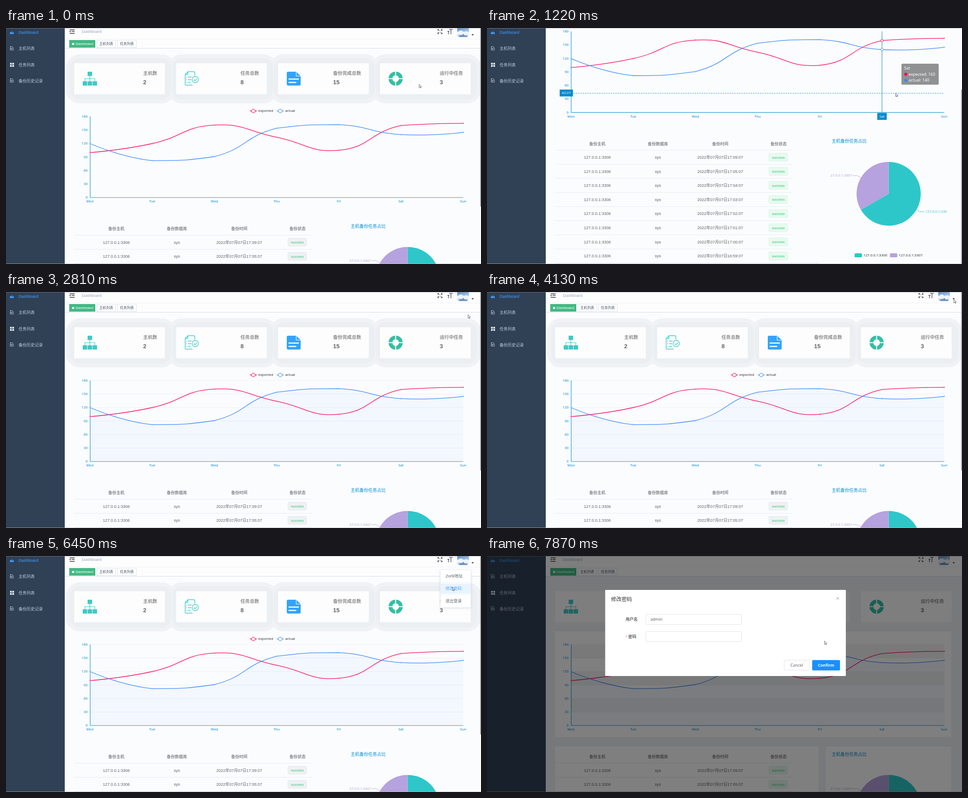
Recreate the animation shown at these times as an HTML page. Size 1059 px wide and 529 px high, loop 8000 ms.

```html
<!DOCTYPE html>
<html lang="zh">
<head>
<meta charset="utf-8">
<title>Dashboard</title>
<style>
html, body { margin: 0; width: 100%; height: 100%; overflow: hidden; background: #fbfcfe; }
svg { display: block; width: 1059px; height: 529px; font-family: "Liberation Sans", "Noto Sans CJK SC", sans-serif; }
text { white-space: pre; }
.n { font-family: "Noto Sans", "Noto Sans CJK SC", sans-serif; }
.tag { fill: #eef1f3; stroke: #e2e6ea; }
.green .tag { fill: #e7faf0; stroke: #d0f5e0; }
</style>
</head>
<body>
<svg id="stage" viewBox="0 0 1059 529"></svg>
<script>
const LOOP = 8000;
const stage = document.getElementById('stage');
const RED = '#ff005a', BLUE = '#3888fa', AXIS = '#008acd', TEAL = '#2ec7c9', LILAC = '#b6a2de';

// --- drawing helpers; text is placed by its vertical centre
const text = (x, y, s, size, fill, more = '') =>
  `<text x="${x}" y="${y + size * .36}" font-size="${size}" fill="${fill}" ${more}>${s}</text>`;
const rect = (x, y, w, h, fill, more = '') =>
  `<rect x="${x}" y="${y}" width="${w}" height="${h}" fill="${fill}" ${more}/>`;
const path = (d, stroke, width = 1, more = '') =>
  `<path d="${d}" fill="none" stroke="${stroke}" stroke-width="${width}" ${more}/>`;
const shape = (d, fill) => `<path d="${d}" fill="${fill}"/>`;
const dot = (x, y, r, fill, more = '') => `<circle cx="${x}" cy="${y}" r="${r}" fill="${fill}" ${more}/>`;
const ring = (x, y, r, color, width, fill = '#fff') => dot(x, y, r, fill, `stroke="${color}" stroke-width="${width}"`);
const group = (id, body) => `<g id="${id}">${body}</g>`;
const each = (list, f) => list.map(f).join('');
const range = n => [...Array(n).keys()];
const MID = ' text-anchor="middle"', END = ' text-anchor="end"', BOLD = ' font-weight="bold"', N = ' class="n"';

// --- sidebar
function sidebar() {
  const ink = '#bfcbd9';
  const doc = y => path(`M16 ${y - 1}v-1.500l-2-2h-4.500v8h2.500M10.500 ${y - 1}h4M10.500 ${y + 1}h2`, ink, .9) +
    ring(14.8, y + 1.8, 2.3, ink, .9, 'none');
  return rect(0, 0, 131, 529, '#304156') +
    shape('M8.500 13.500a4.600 4.600 0 1 1 9 0z', '#409eff') + path('M13 12l1.500-4', '#304156') +
    doc(46) + doc(118) +
    each(range(4), i => rect(9 + i % 2 * 5, 78 + (i >> 1) * 5, 4, 4, '#d8e0ea')) +
    each(['Dashboard', '主机列表', '任务列表', '备份历史记录'], (s, i) =>
      text(28, 10 + i * 36.2, s, 9, i ? ink : '#409eff'));
}

// --- top bar and tags
function header() {
  const ink = '#5a5e66';
  const tag = (x, s) => rect(x, 27.5, 42, 16, '#fff', 'stroke="#d8dce5" stroke-width=".8"') +
    text(x + 21, 35.5, s, 7.8, '#495060', MID);
  const arrow = a => `<g transform="rotate(${a} 967.500 8)">` +
    shape('M962 2.500h4l-1.300 1.300 2 2-1 1-2-2-1.700 1.300z', ink) + '</g>';
  return rect(131, 0, 928, 45, '#fdfdfe') +
    path('M131 24.500H1059', '#eceff2', .8) + path('M131 45.500H1059', '#d8dce5') +
    path('M142 4h11M146 7.500h7M142 12h11', '#333', 1.4) + shape('M142 5.800v4l2.800-2z', '#333') +
    text(169, 8, 'Dashboard', 9, '#97a8be') +
    rect(141, 27, 58, 17, '#42b983') + dot(149.7, 35.7, 2.5, '#fff') + text(155, 35.5, 'Dashboard', 8, '#fff') +
    tag(202.5, '主机列表') + tag(248.5, '任务列表') +
    each([0, 90, 180, 270], arrow) + path('M988 3.200h8M992 3v11M984 7.500h5M986.500 7.500v6.500', ink, 1.5) +
    rect(1006, -4, 26, 25, 'url(#sky)', 'rx="6"') +
    shape('M1006 9l8-4 7 4 5-2 6 3v5h-26z', '#eef4fa') + shape('M1009 20l3-4h5l2-3 4 4h6l-1 3z', '#6d8fbd') +
    shape('M1037.800 14h5.200l-2.600 3z', '#333');
}

// --- four number cards
const CARDS = [['主机数', 2], ['任务总数', 8], ['备份完成总数', 15], ['运行中任务', 3]];
const cardX = i => 152 + i * 227.3;
const shadows = () => each([['#f0f2f5', 0], ['#eceff2', 9]], ([fill, inset]) => each(range(4), i =>
  rect(cardX(i) - 18 + inset, 59 + inset, 243 - 2 * inset, 110 - 2 * inset, fill, `rx="${30 - inset}"`)));

function cards() {
  const mint = '#40c9c6';
  const icons = [
    rect(182, 98, 10, 9.5, mint) + each(range(3), i => rect(171 + i * 11, 119.5, 10, 9.5, mint)) +
      path('M187 107v13M176 120v-6.500h22v6.500', mint, 1.2),
    path('M416 128h-14.500q-2 0-2-2v-22l6-6h13q2.500 0 2.500 2.500v6M405.500 98v6h-6', mint, 1.4) +
      each(range(3), i => path(`M402 ${110 + i * 6}h2m2 0h${8 - i}`, mint, 1.4)) +
      ring(422, 115.5, 7, mint, 1.4) + path('M418.500 115.500l2.700 2.700 4.600-5', mint, 1.4),
    shape('M629 98h18l10 10v18q0 3-3 3h-25q-3 0-3-3v-25q0-3 3-3z', '#36a3f7') +
      path('M647 98.500v9.500h9.500', '#fff', 1.2) + path('M630 114.500h23M630 122h17', '#fff', 2.4),
    ring(868.7, 113.5, 11.6, '#34bfa3', 8.4, 'none') +
      path('M868.700 97v9m0 15v9M852 113.500h9m15 0h9', '#fdfdfd', 2.2)
  ];
  return each(CARDS, ([name, count], i) => {
    const x = cardX(i) + 185 - name.length * 10.4;
    return rect(cardX(i), 79, 202, 69.5, '#fdfdfe') + icons[i] +
      text(x, 101, name, 10.4, '#8c8c8c', BOLD) + text(x, 121.5, count, 13, '#666', BOLD);
  });
}

// --- line chart
const X0 = 187.5, X1 = 1019.3, Y0 = 380;
const px = i => X0 + i * (X1 - X0) / 6, py = v => Y0 - v * 1.0083;
const expected = [100, 120, 161, 134, 105, 160, 165], actual = [120, 82, 91, 154, 162, 140, 145];

function smooth(values) {
  const pts = values.map((v, i) => [px(i), py(v)]);
  const ys = pts.map(p => p[1]), lo = Math.min(...ys), hi = Math.max(...ys);
  const dist = (a, b) => Math.hypot(a[0] - b[0], a[1] - b[1]);
  let c0 = pts[0], d = `M${pts[0]}`;
  for (let i = 1; i < pts.length; i++) {
    const a = pts[i - 1], p = pts[i], b = pts[i + 1];
    let c1 = p, next = p;
    if (b) {
      const k = dist(p, b) / (dist(p, b) + dist(p, a));
      const handle = f => [p[0] + (b[0] - a[0]) * f, Math.min(hi, Math.max(lo, p[1] + (b[1] - a[1]) * f))];
      c1 = handle((k - 1) / 2);
      next = handle(k / 2);
    }
    d += `C${c0} ${c1} ${p}`;
    c0 = next;
  }
  return d;
}

function chart() {
  const ticks = range(7).map(i => i * 30);
  const series = (values, color) => path(smooth(values), color, 1.3) +
    each(values, (v, i) => ring(px(i), py(v), 1.2, color, .8));
  const key = (x, s, color) => path(`M${x - 8} 186h16`, color, 1.3) + ring(x, 186, 4, color, 1.1) +
    text(x + 11, 185.5, s, 7.8, '#333', N);
  return group('bands', each([180, 120, 60], v => rect(X0, py(v), X1 - X0, 30.2, '#000', 'opacity=".045"'))) +
    group('area', each(ticks.slice(1), v => path(`M${X0} ${py(v)}H${X1}`, '#eaecef', .8)) +
      `<path d="${smooth(actual)}V${Y0}H${X0}z" fill="${BLUE}" opacity=".04"/>`) +
    path(`M187.700 198V${Y0}H${X1}`, AXIS, 1.2, 'opacity=".85"') +
    each(ticks, v => text(182, py(v) - .5, v, 7.8, AXIS, N + END)) +
    each(['Mon', 'Tue', 'Wed', 'Thu', 'Fri', 'Sat', 'Sun'], (s, i) => text(px(i), 388.5, s, 7.8, AXIS, N + MID)) +
    series(expected, RED) + series(actual, BLUE) + key(551.5, 'expected', RED) + key(611.5, 'actual', BLUE);
}

// --- cross-hair and tooltip
function pointer() {
  const label = (x, y, w, s) => rect(x - w / 2, y - 7.7, w, 15.4, AXIS) +
    text(x, y - .3, s, 7.8, '#fff', N + MID + ' font-weight="500"');
  return path(`M${px(5)} 198V${Y0}`, AXIS) + path(`M${X0} 336.800H${X1}`, AXIS, .9, 'stroke-dasharray="3 2.200"') +
    ring(px(5), py(160), 2.8, RED, 1) + ring(px(5), py(140), 2.8, BLUE, 1) +
    label(px(5), 388.8, 21, 'Sat') + label(176.8, 336.3, 29.5, '43.07');
}
const tip = () => rect(924, 0, 83, 47, '#323232', 'rx="2.600" opacity=".53"') + text(930, 10, 'Sat', 9.1, '#fff', N) +
  each([['expected: 160', RED], ['actual: 140', BLUE]], ([s, c], i) =>
    dot(933.7, 23.7 + i * 13.6, 3.4, c) + text(940, 23.5 + i * 13.6, s, 9.1, '#fff', N));

// --- table and pie
function table() {
  const cols = [246, 381, 520, 650];
  const time = i => {
    const m = i ? 1026 - i : 1029;
    return `${m / 60 | 0}:${String(m % 60).padStart(2, 0)}:07`;
  };
  return each(['备份主机', '备份数据库', '备份时间', '备份状态'], (s, i) => text(cols[i], 450, s, 9, '#85888e', BOLD + MID)) +
    each(range(8), i => {
      const y = 480.3 + i * 31.64;
      return path(`M152 ${y - 16}H682`, '#e6eaf0', .9) +
        each(['127.0.0.1:3306', 'sys', '2022年07月07日' + time(i)], (s, j) => text(cols[j], y, s, 9, '#606266', MID)) +
        rect(628.5, y - 9.2, 41.5, 18, '#fff', 'class="tag" rx="2" stroke-width=".8"') +
        text(cols[3] - .5, y, 'success', 7.9, '#2fc271', MID);
    }) + path('M152 717.500H740', '#e2e6eb');
}

function pie() {
  const cx = 895.5, cy = 562.2, r = 71.5, ex = cx - r * Math.cos(Math.PI / 6), ey = cy + r / 2;
  const slice = (big, sweep, c) => shape(`M${cx} ${cy}V${cy - r}A${r} ${r} 0 ${big} ${sweep} ${ex} ${ey}z`, c);
  const key = (x, s, c) => rect(x, 695.7, 16.5, 9, c, 'rx="2.600"') + text(x + 19.7, 700, s, 7.8, '#333', N);
  return text(768.5, 444, '主机备份任务占比', 9.75, AXIS) + slice(1, 1, TEAL) + slice(0, 0, LILAC) +
    path('M833.500 526.500l-8-5h-10', LILAC, .9) + text(814, 520.8, '27.0.0.1:3307', 7.8, LILAC, N + END) +
    path('M957.500 598l8 4.500h10', TEAL, .9) + text(977, 601.5, '127.0.0.1:330', 7.8, TEAL, N) +
    key(819.5, '127.0.0.1:3306', TEAL) + key(898.3, '127.0.0.1:3307', LILAC);
}

// --- account menu and password dialog
const menu = () => rect(968.5, 31, 68, 84, '#fff', 'rx="2.600" stroke="#e6ebf5" stroke-width=".8" filter="url(#lift)"') +
  path('M969 59H1036M969 87H1036', '#ebeef5', .8) + rect(969, 33.5, 67, 23, '#e8f4ff', 'id="hover"') +
  each(['Zorlit地址', '修改密码', '退出登录'], (s, i) => text(980, 45 + i * 28, s, 9, '#606266', 'class="item"'));

function dialog() {
  const ink = '#606266';
  const box = (x, y, w) => rect(x, y, w, 22.6, '#fff', 'rx="2.600" stroke="#dcdfe6" stroke-width=".9"');
  return rect(263.5, 76, 536.5, 193, '#fff', 'rx="1.300"') + text(276.5, 96.5, '修改密码', 11.7, '#303133') +
    path('M779 92l6 6m0-6l-6 6', '#909399', .9) +
    text(309, 142, '用户名', 9, ink, BOLD) + box(354, 131, 213.5) + text(364.5, 142, 'admin', 9, ink, N) +
    text(309, 181, '*', 9, '#f56c6c') + text(315, 180.5, '密码', 9, ink, BOLD) + box(354, 169.3, 213.5) +
    box(662.7, 233.5, 56) + text(690.5, 244.5, 'Cancel', 9, ink, N + MID) +
    rect(725, 233.3, 62, 23.2, '#1890ff', 'rx="2"') +
    text(756, 244.5, 'Confirm', 9, '#fff', N + MID + ' font-weight="600"');
}

stage.innerHTML = `<defs>
  <linearGradient id="sky" x2=".3" y2="1"><stop stop-color="#3f74bd"/><stop offset=".6" stop-color="#9fc0e4"/><stop offset="1" stop-color="#dce8f4"/></linearGradient>
  <filter id="lift" x="-20%" y="-20%" width="140%" height="150%"><feDropShadow dx="0" dy="1.300" stdDeviation="2.500" flood-opacity=".13"/></filter>
</defs>` +
  rect(0, 0, 1059, 529, '#fbfcfe') +
  group('page',
    group('soft', shadows()) +
    group('panels', rect(131, 46, 928, 700, '#f0f2f5') + rect(152, 169, 883, 237, '#fff') +
      rect(152, 427, 587, 290.5, '#fff') + rect(755, 427, 280, 290.5, '#fff')) +
    header() + cards() + chart() + group('pointer', pointer()) + table() + pie()) +
  rect(1057, 0, 2, 400, '#a3a6ab', 'id="thumb"') + group('tip', tip()) + sidebar() +
  rect(0, 0, 1059, 1, '#8a8f94', 'opacity=".6"') + rect(0, 528, 1059, 1, '#b4b8bc', 'opacity=".7"') +
  group('menu', menu()) + rect(0, 0, 1059, 529, '#000', 'id="dim"') + group('dialog', dialog()) +
  `<path id="cursor" d="M0 0v7.600l1.800-1.600 1.200 2.600 1.200-.6-1.200-2.500h2.300z" fill="#fff" stroke="#333" stroke-width=".7"/>`;

// --- motion
const ramp = (t, a, b) => Math.min(1, Math.max(0, (t - a) / (b - a)));
const ease = p => p * p * (3 - 2 * p);

// cursor way points: time, x, y
const WAY = [[260, 921, 126], [1220, 911, 146], [1650, 911, 146], [2180, 930, 206], [2810, 1030, 51],
  [3200, 1032, 13], [3800, 1032, 13], [4130, 1041, 17], [5170, 1041, 17], [5470, 1028, 41],
  [6070, 995, 98], [6690, 995, 52], [7050, 994, 72], [7360, 994, 72], [7870, 752.5, 190.5]];
function cursorAt(t) {
  const i = Math.max(1, WAY.findIndex(k => k[0] >= t)), a = WAY[i - 1], b = WAY[i];
  const p = ramp(t, a[0], b[0]);
  return [a[1] + (b[1] - a[1]) * p, a[2] + (b[2] - a[2]) * p];
}

const $ = id => document.getElementById(id);
const show = (id, opacity) => $(id).setAttribute('opacity', +opacity);
const move = (id, x, y) => $(id).setAttribute('transform', `translate(${x} ${y})`);
const items = document.querySelectorAll('.item');

function draw(time) {
  const t = Math.min(time, 7870), [cx, cy] = cursorAt(t);
  const scroll = 200 * (ease(ramp(t, 200, 1375)) - ease(ramp(t, 2125, 2420)));
  move('page', 0, -scroll);
  move('thumb', 0, scroll * .723);
  move('cursor', cx, cy);

  const pointing = t >= 1100 && t < 1790, asking = t >= 7330;
  show('pointer', pointing);
  show('tip', pointing);
  move('tip', 0, 80 + 3 * ramp(t, 1220, 1500));
  show('soft', !asking);
  show('panels', asking);
  show('thumb', !asking);
  show('bands', t >= 7480);
  show('area', t >= 2570);
  stage.classList.toggle('green', asking || scroll > 1);

  const open = ramp(t, 4680, 4900) - ramp(t, 7280, 7480);
  $('menu').setAttribute('transform', `translate(0 ${31 - 31 * open}) scale(1 ${open})`);
  show('menu', open);
  const hover = t < 5440 ? -1 : Math.min(2, Math.floor((cy - 31) / 28));
  show('hover', hover >= 0);
  move('hover', 0, hover * 28);
  items.forEach((e, i) => e.setAttribute('fill', i === hover ? '#46a6ff' : '#606266'));

  const p = ramp(t, 7300, 7720);
  show('dim', p / 2 * asking);
  show('dialog', ease(p) * asking);
  move('dialog', 0, 12 * (p - 1));
}

function tick() {
  draw(performance.now() % LOOP);
  requestAnimationFrame(tick);
}
tick();
</script>
</body>
</html>
```
